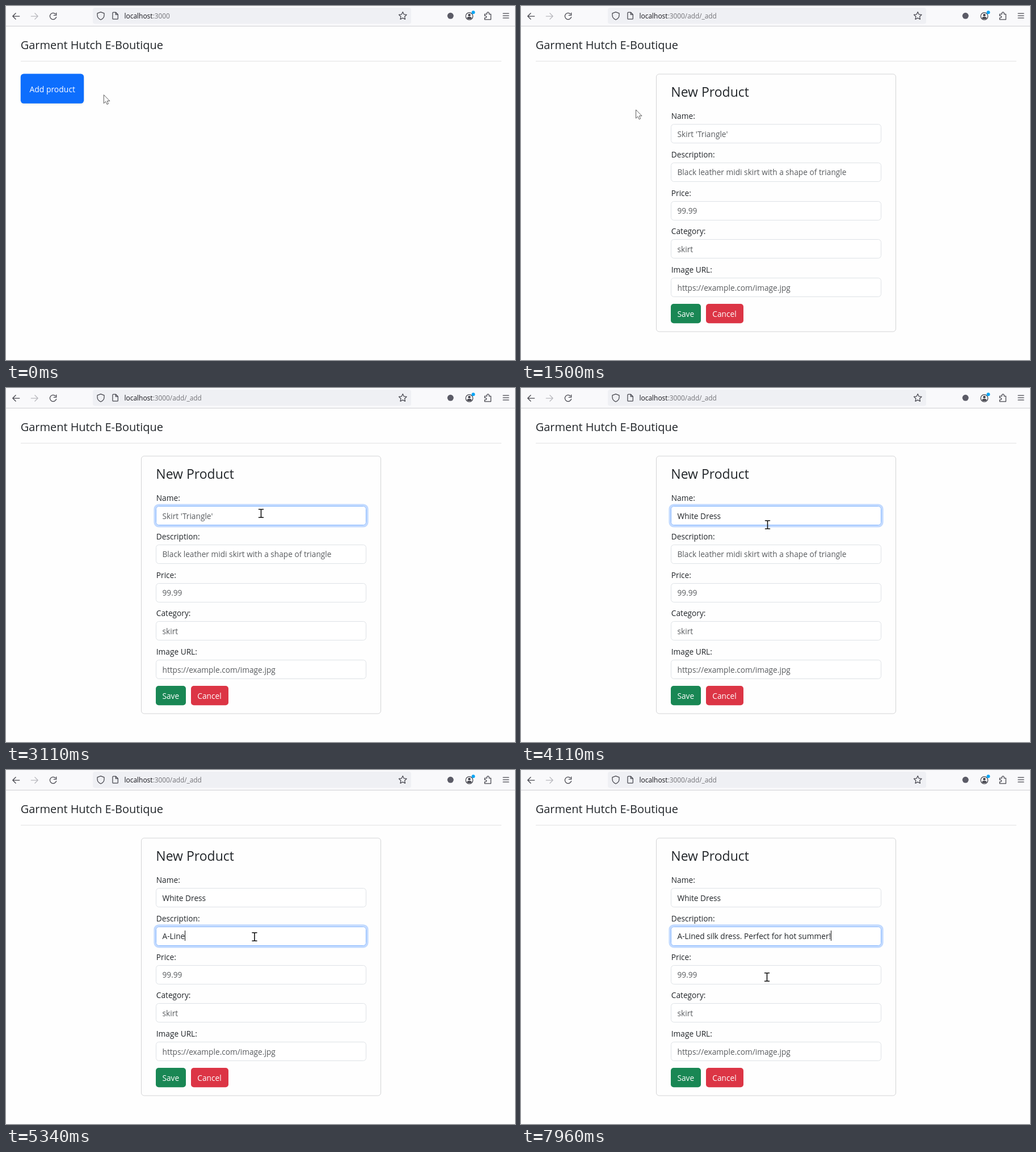
An HTML page with a canvas that plays this animation: 897 px wide and 624 px high, repeating every 8000 ms.

```html
<!DOCTYPE html>
<html lang="en">
<head>
<meta charset="utf-8">
<title>Add product</title>
<style>
html, body { margin: 0; width: 100%; height: 100%; overflow: hidden; background: #fefefe; }
canvas { display: block; }
</style>
</head>
<body>
<canvas id="stage" width="897" height="624"></canvas>
<script>
const ctx = document.getElementById('stage').getContext('2d');
const LOOP = 8000;
const INK = '#212529', HINT = '#595c5f', ICON = '#45454d';

const NAME = 'White Dress';
const DESCRIPTION = 'A-Lined silk dress. Perfect for hot summer!';
const FIELDS = [
  ['Name:', "Skirt 'Triangle'"],
  ['Description:', 'Black leather midi skirt with a shape of triangle'],
  ['Price:', '99.99'],
  ['Category:', 'skirt'],
  ['Image URL:', 'https://example.com/image.jpg']
];
const fieldTop = i => 208 + i * 67.8;

// Pointer moves: start, end, number of steps, path
const MOVES = [
  [50, 290, 5, [[172, 156], [157, 158], [139, 158], [123, 157], [115, 156], [113, 155.5]]],
  [1430, 1960, 9, [[113, 155.5], [190, 178], [300, 217], [385, 242], [432, 232], [449.5, 221]]],
  [4110, 4340, 5, [[449.5, 221], [434.5, 241], [430, 250], [426, 260], [423, 268], [423, 272]]],
  [4390, 4560, 4, [[423, 272], [428, 280], [433, 287], [436, 292], [438, 294]]],
  [7559, 7960, 8, [[438, 294], [434, 302], [429, 313], [425, 325], [427, 338], [430, 350], [432, 358], [433, 362], [433.5, 365]]]
];
const CLICKS = [[650, 720], [2570, 2640], [4800, 4860]];
const CARET_OFF = [[3110, 3370], [4080, 4800], [6960, 7030]];

const within = (t, spans) => spans.some(([a, b]) => t >= a && t < b);

// Number of steps done when n steps are spread evenly from a to b
function steps(t, a, b, n) {
  if (t < a) return 0;
  return Math.min(n, 1 + Math.floor((t - a) / (b - a) * (n - 1) + 1e-6));
}

function along(path, p) {
  const pos = p * (path.length - 1);
  const i = Math.min(Math.floor(pos), path.length - 2);
  const f = pos - i;
  return [0, 1].map(k => path[i][k] + (path[i + 1][k] - path[i][k]) * f);
}

function pointerAt(t) {
  let pos = MOVES[0][3][0];
  for (const [a, b, n, path] of MOVES) {
    if (t >= a) pos = along(path, steps(t, a, b, n) / n);
  }
  return pos;
}

function text(str, x, y, size = 13.7, color = INK) {
  ctx.font = `${size}px "Open Sans", "Noto Sans", sans-serif`;
  ctx.fillStyle = color;
  ctx.fillText(str, x, y);
}

function box(x, y, w, h, r, fill, stroke, width = 1) {
  ctx.beginPath();
  ctx.roundRect(x, y, w, h, r);
  if (fill) { ctx.fillStyle = fill; ctx.fill(); }
  if (stroke) { ctx.strokeStyle = stroke; ctx.lineWidth = width; ctx.stroke(); }
}

function rect(x, y, w, h, color) {
  ctx.fillStyle = color;
  ctx.fillRect(x, y, w, h);
}

function disc(x, y, r, color) {
  ctx.beginPath();
  ctx.arc(x, y, r, 0, Math.PI * 2);
  ctx.fillStyle = color;
  ctx.fill();
}

function icon(d, x, y, color = ICON, width = 1.25) {
  ctx.save();
  ctx.translate(x, y);
  ctx.lineCap = ctx.lineJoin = 'round';
  ctx.strokeStyle = color;
  ctx.lineWidth = width;
  ctx.stroke(new Path2D(d));
  ctx.restore();
}

function starPath(outer, inner) {
  let d = '';
  for (let i = 0; i < 10; i++) {
    const r = i % 2 ? inner : outer, a = i * Math.PI / 5;
    d += (i ? 'L' : 'M') + r * Math.sin(a) + ' ' + -r * Math.cos(a);
  }
  return d + 'Z';
}

function drawToolbar(path) {
  rect(0, 0, 897, 35, '#f9f9fb');
  rect(0, 35, 897, 1, '#cfcfd2');
  box(153, 3, 561, 28.5, 4, '#eff0f4');

  icon('M6 0H-6M-.7 -5.3L-6 0L-.7 5.3', 17.8, 18);
  icon('M-6 0H6M.7 -5.3L6 0L.7 5.3', 50.2, 18, '#b9b9be');
  icon('M5.6 1.5A5.7 5.7 0 1 1 4.2 -4M5.7 -6V-1.6H1.3', 83, 18);
  icon('M0 -6.7L6 -4.5V-1C6 3 3.5 5.5 0 7C-3.5 5.5 -6 3 -6 -1V-4.5Z', 167, 17.3);
  icon('M-4.6 -4.7Q-4.6 -6 -3.3 -6H1L4.8 -2.2V4.7Q4.8 6 3.5 6H-3.3Q-4.6 6 -4.6 4.7ZM.8 -6V-2H4.8', 192.5, 17.2);
  icon(starPath(7.2, 3.5), 699.2, 17.6);
  disc(783.3, 17.3, 5.5, '#5b5b66');

  icon('M6.3 0A6.3 6.3 0 1 1 -6.3 0A6.3 6.3 0 1 1 6.3 0', 816.5, 18);
  disc(816.5, 16, 2.3, ICON);
  ctx.beginPath();
  ctx.ellipse(816.5, 21, 4, 2, 0, 0, Math.PI * 2);
  ctx.fill();
  disc(823.5, 11.2, 3, '#0aa5f5');

  icon('M-5.5 -3H-1.5V-4.5A1.9 1.9 0 0 1 2.3 -4.5V-3H5.5V6.5H-5.5V3.6H-4A1.8 1.8 0 0 0 -4 0H-5.5Z', 849, 17.3);
  icon('M-5 -4H5M-5 0H5M-5 4H5', 881, 17.2);

  text('localhost', 208.5, 22.3, 11.95, '#15141a');
  text(path, 258.7, 22.3, 11.8, '#737378');
}

function drawAddButton(t, x) {
  const color = t >= 860 ? '#0a58ca' : x < 137 ? '#0b5ed7' : '#0d6efd';
  ctx.save();
  ctx.shadowColor = 'rgba(0,0,0,.075)';
  ctx.shadowBlur = 3.6;
  ctx.shadowOffsetY = 1.8;
  box(25.8, 119.4, 111.4, 52.4, 5.5, color);
  ctx.restore();
  text('Add product', 41.4, 151.8, 13.95, '#fff');
}

function drawField(i, value, focus) {
  const y = fieldTop(i), [label, hint] = FIELDS[i];
  text(label, 264.8, y - 9);
  if (focus > 0) {
    box(262.2, y - 1.8, 374.6, 37.6, 7, null, `rgba(13,110,253,${0.25 * focus})`, 3.6);
  }
  box(264.5, Math.round(y) + 0.5, 370, 33, 5, '#fff', focus > 0.5 ? '#86b7fe' : '#dee2e6');
  text(value || hint, 275.5, y + 22.6, 13.7, value ? INK : HINT);
}

function drawCaret(i, value) {
  text(value, -900, -50);
  const x = 275.5 + ctx.measureText(value).width;
  rect(Math.round(x), Math.round(fieldTop(i) + 7.5), 1, 18, '#111');
}

function drawForm(t) {
  const nameCount = (t >= 3370 ? 1 : 0) + steps(t, 3550, 4060, 10);
  const descCount = steps(t, 5040, 5580, 10) + steps(t, 5650, 6430, 14) +
    steps(t, 6490, 7250, 15) + steps(t, 7330, 7502, 4);
  const values = [NAME.slice(0, nameCount), DESCRIPTION.slice(0, descCount)];
  const swap = steps(t, 4860, 4980, 3) / 3;
  const focus = [steps(t, 2640, 2770, 3) / 3 - swap, swap];

  box(238.5, 120, 422, 454, 5, '#fefefe', '#d3d4d5');
  text('New Product', 264.3, 159.5, 23);
  FIELDS.forEach((_, i) => drawField(i, values[i] || '', focus[i] || 0));

  box(264, 525, 53, 34.2, 5, '#198754');
  text('Save', 275.5, 548, 13.7, '#fff');
  box(326, 525, 66, 34.2, 5, '#dc3545');
  text('Cancel', 337.3, 548, 13.7, '#fff');

  if (t >= 2570 && !within(t, CARET_OFF)) {
    const active = t < 4800 ? 0 : 1;
    drawCaret(active, values[active]);
  }
}

function drawPointer(x, y, formOpen) {
  const overField = formOpen && x > 264 && x < 635 &&
    FIELDS.some((_, i) => y >= fieldTop(i) && y <= fieldTop(i) + 34);
  if (overField) {
    icon('M-4 -7.3H-1.2L0 -6.6L1.2 -7.3H4M0 -6.6V6.6M-4 7.3H-1.2L0 6.6L1.2 7.3H4', x, y, '#111', 1.6);
    return;
  }
  ctx.save();
  ctx.translate(x, y);
  const arrow = new Path2D('M.3 .6V15.6L3.6 12.4L6 17.4L8.4 16.3L6.2 11.4H10.8Z');
  ctx.fillStyle = '#fff';
  ctx.fill(arrow);
  ctx.strokeStyle = '#333';
  ctx.lineWidth = 0.8;
  ctx.lineJoin = 'round';
  ctx.stroke(arrow);
  ctx.restore();
}

function draw(t) {
  const formOpen = t >= 920;
  const [x, y] = pointerAt(t);
  rect(0, 0, 897, 624, '#fefefe');
  drawToolbar(formOpen ? ':3000/add/_add' : ':3000');
  text('Garment Hutch E-Boutique', 25.7, 75.7, 19.95);
  rect(26, 96.8, 847, 0.9, '#dedfe0');
  if (formOpen) drawForm(t);
  else drawAddButton(t, x);
  if (within(t, CLICKS)) disc(x, y, 11, 'rgba(255,244,0,.65)');
  drawPointer(x, y, formOpen);
}

const start = performance.now();
function tick() {
  draw((performance.now() - start) % LOOP);
  requestAnimationFrame(tick);
}
tick();
</script>
</body>
</html>
```
